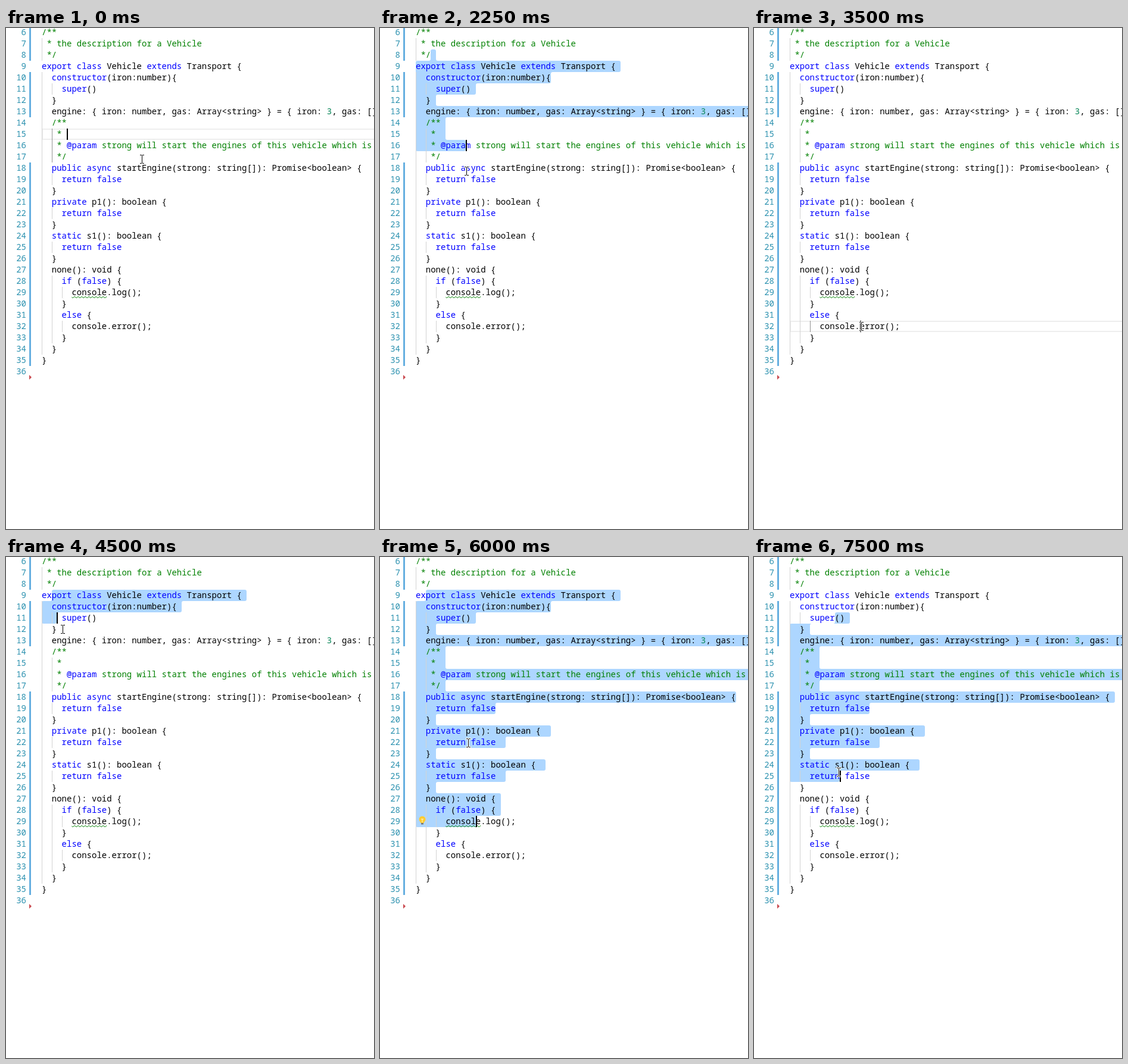
An HTML page with a canvas for the animation above (8000 ms loop, 618 by 842 pixels).

```html
<!DOCTYPE html>
<html lang="en">
<head>
<meta charset="utf-8">
<title>Code editor selection</title>
<style>
  html, body { margin: 0; width: 100%; height: 100%; overflow: hidden; background: #fff; }
  canvas { display: block; }
</style>
</head>
<body>
<canvas id="stage" width="618" height="842"></canvas>
<script>
const ctx = document.getElementById('stage').getContext('2d');
const W = 618, H = 842, LOOP = 8000;
const LEFT = 60, CHAR = 8.4, ROW = 19, FIRST = 6;

// Trailing spaces matter: they widen the selection.
const code = [
  '/**',
  ' * the description for a Vehicle',
  ' */',
  'export class Vehicle extends Transport {',
  '  constructor(iron:number){',
  '    super()',
  '  }',
  '  engine: { iron: number, gas: Array<string> } = { iron: 3, gas: [] }',
  '  /**',
  '   * ',
  '   * @param strong will start the engines of this vehicle which is fast',
  '   */',
  '  public async startEngine(strong: string[]): Promise<boolean> {',
  '    return false',
  '  }',
  '  private p1(): boolean { ',
  '    return false ',
  '  }',
  '  static s1(): boolean { ',
  '    return false ',
  '  }',
  '  none(): void {',
  '    if (false) {',
  '      console.log();',
  '    }',
  '    else {',
  '      console.error();',
  '    }',
  '  }',
  '}',
  ''
];

const keywords = /^(export|class|extends|constructor|super|public|async|private|static|return|false|if|else)$/;

// Each guide: column, first line, last line.
const guides = [
  [0, 7, 8], [0, 10, 34], [2, 11, 11], [2, 15, 17], [2, 19, 19],
  [2, 22, 22], [2, 25, 25], [2, 28, 33], [4, 29, 29], [4, 32, 32]
];

// at: time, mouse: pointer centre, caret: [line, column], from: selection anchor,
// bare: selected lines drawn without a line-break cell.
const steps = [
  { at: 0, mouse: [228, 220], caret: [15, 5] },
  { at: 250, mouse: [227, 223], caret: [17, 5] },
  { at: 500, mouse: [220, 210], caret: [17, 5] },
  { at: 750, mouse: [190, 160], caret: [17, 5] },
  { at: 1000, mouse: [150, 105], caret: [17, 5] },
  { at: 1250, mouse: [122, 65], caret: [17, 5] },
  { at: 1500, mouse: [113, 48], caret: [8, 3] },
  { at: 1750, mouse: [117, 77], caret: [8, 3] },
  { at: 2000, mouse: [130, 145], from: [8, 3], caret: [11, 8] },
  { at: 2250, mouse: [145, 240], from: [8, 3], caret: [16, 10] },
  { at: 2500, mouse: [158, 355], from: [8, 3], caret: [19, 13] },
  { at: 2750, mouse: [166, 410], from: [8, 3], caret: [22, 15] },
  { at: 3000, mouse: [172, 452], from: [8, 3], caret: [24, 19], hideCaret: true },
  { at: 3250, mouse: [178, 490], from: [8, 3], caret: [28, 14] },
  { at: 3500, mouse: [180, 501], caret: [32, 14] },
  { at: 3750, mouse: [176, 495], caret: [32, 14] },
  { at: 4000, mouse: [120, 240], caret: [32, 14] },
  { at: 4250, mouse: [80, 66], caret: [9, 2] },
  { at: 4500, mouse: [95, 121], from: [9, 2], caret: [11, 3], bare: [] },
  { at: 4750, mouse: [135, 315], from: [9, 2], caret: [21, 8], bare: [10, 18, 19] },
  { at: 5000, mouse: [158, 444], from: [9, 2], caret: [29, 12], bare: [10, 18, 19] },
  { at: 5500, mouse: [157, 430], from: [9, 2], caret: [29, 12], bare: [10, 18, 19], bulb: true },
  { at: 5750, mouse: [152, 360], from: [9, 2], caret: [29, 12], bare: [10, 18, 19], bulb: true },
  { at: 6000, mouse: [148, 312], from: [9, 2], caret: [29, 12], bare: [10, 18, 19], bulb: true },
  { at: 6500, mouse: [138, 108], caret: [11, 9], brackets: true },
  { at: 7000, mouse: [140, 189], from: [11, 9], caret: [14, 5], brackets: true },
  { at: 7250, mouse: [141, 280], from: [11, 9], caret: [19, 10] },
  { at: 7500, mouse: [142, 361], from: [11, 9], caret: [25, 10] }
];

const colX = col => LEFT + col * CHAR;
const lineY = line => (line - FIRST) * ROW - 2;

function box(color, x, y, w, h) {
  ctx.fillStyle = color;
  ctx.fillRect(x, y, w, h);
}

// Fills the small concave notch where two selection rows of different width meet.
function notch(x, y, dx, dy) {
  ctx.beginPath();
  ctx.moveTo(x, y);
  ctx.lineTo(x + dx, y);
  ctx.quadraticCurveTo(x, y, x, y + dy);
  ctx.fill();
}

function drawSelection({ from, caret, bare = [10, 19] }) {
  const rows = [];
  for (let line = from[0]; line <= caret[0]; line++) {
    const cells = code[line - FIRST].length + (bare.includes(line) ? 0 : 1);
    rows.push({
      y: lineY(line),
      left: Math.round(line === from[0] ? colX(from[1]) : LEFT),
      right: Math.round(line === caret[0] ? colX(caret[1]) : colX(cells))
    });
  }
  ctx.fillStyle = '#add6ff';
  rows.forEach((row, i) => {
    const prev = rows[i - 1], next = rows[i + 1];
    const corners = [
      !prev || prev.left > row.left,
      !prev || prev.right < row.right,
      !next || next.right < row.right,
      !next
    ].map(round => round ? 3 : 0);
    ctx.beginPath();
    ctx.roundRect(row.left, row.y, row.right - row.left, ROW, corners);
    ctx.fill();
    if (!next) return;
    if (next.right < row.right) notch(next.right, next.y, 3, 3);
    if (next.right > row.right) notch(row.right, next.y, 3, -3);
    if (next.left < row.left) notch(row.left, next.y, -3, -3);
  });
}

function drawLineHighlight(line) {
  const y = lineY(line);
  ctx.strokeStyle = '#eee';
  ctx.lineWidth = 2;
  ctx.strokeRect(LEFT + 1, y + 1, W, ROW - 2);
}

function drawGuides(step) {
  const line = step.caret[0];
  const indent = code[line - FIRST].search(/\S|$/);
  const inside = ([, first, last]) => line >= first && line <= last;
  const active = step.from ? null :
    guides.filter(g => inside(g) && g[0] < indent).pop();
  for (const guide of guides) {
    const [col, first, last] = guide;
    box(guide === active ? '#939393' : '#d3d3d3',
      Math.round(colX(col)), lineY(first), 1, (last - first + 1) * ROW);
  }
}

function tokenColor(token, comment) {
  if (token === '@param' || (!comment && keywords.test(token))) return '#0000ff';
  if (comment) return '#008000';
  return /^\d+$/.test(token) ? '#098658' : '#000';
}

function drawCode() {
  ctx.font = '14px "Noto Sans Mono", "DejaVu Sans Mono", monospace';
  ctx.textBaseline = 'alphabetic';
  code.forEach((text, i) => {
    const y = lineY(i + FIRST) + 14;
    const comment = /^\s*\/?\*/.test(text);
    ctx.textAlign = 'left';
    for (const match of text.matchAll(/@?\w+|[^\w\s@]+/g)) {
      ctx.fillStyle = tokenColor(match[0], comment);
      ctx.fillText(match[0], colX(match.index), y);
    }
    ctx.textAlign = 'right';
    ctx.fillStyle = '#2b91af';
    ctx.fillText(i + FIRST, 34, y);
  });
}

function drawSquiggle() {
  const start = colX(6), end = colX(13), y = lineY(29) + 16;
  ctx.save();
  ctx.beginPath();
  ctx.rect(start, y, end - start, 3);
  ctx.clip();
  ctx.beginPath();
  for (let x = start - 1.2; x < end + 6; x += 6) {
    ctx.lineTo(x, y + 0.3);
    ctx.lineTo(x + 3, y + 2.7);
  }
  ctx.strokeStyle = '#008000';
  ctx.lineWidth = 1;
  ctx.stroke();
  ctx.restore();
}

function drawGutter() {
  for (const [first, last] of [[6, 8], [10, 13], [18, 35]])
    box('#66afe0', 39, lineY(first), 3, (last - first + 1) * ROW);
  const y = lineY(37);
  ctx.fillStyle = '#ca4b51';
  ctx.beginPath();
  ctx.moveTo(39, y - 4);
  ctx.lineTo(43, y);
  ctx.lineTo(39, y + 4);
  ctx.fill();
}

function drawBrackets() {
  for (const col of [9, 10]) {
    const x = Math.round(colX(col));
    box('rgba(0,100,0,0.1)', x, lineY(11), 8, ROW);
    ctx.strokeStyle = '#b9b9b9';
    ctx.lineWidth = 1;
    ctx.strokeRect(x + 0.5, lineY(11) + 0.5, 8, ROW - 1);
  }
}

function drawBulb() {
  const x = 71, y = lineY(29) + 6;
  ctx.fillStyle = '#fc3';
  ctx.beginPath();
  ctx.arc(x, y, 5.5, 0, Math.PI * 2);
  ctx.fill();
  box('#fc3', x - 3, y + 3, 6, 3);
  box('#fff3c4', x - 2, y - 1, 4, 1);
  box('#fff3c4', x - 0.5, y, 1, 5);
  box('#777', x - 2, y + 6, 4, 2.5);
}

function drawPointer([x, y]) {
  const parts = [[-3, -7, 3, 1], [1, -7, 3, 1], [0, -6, 1, 13], [-3, 7, 3, 1], [1, 7, 3, 1]];
  for (const [dx, dy, w, h] of parts) box('#fff', x + dx - 1, y + dy - 1, w + 2, h + 2);
  for (const [dx, dy, w, h] of parts) box('#000', x + dx, y + dy, w, h);
}

function draw(time) {
  const step = steps.findLast(s => s.at <= time);
  const [line, col] = step.caret;
  box('#fff', 0, 0, W, H);
  if (step.from) drawSelection(step);
  else drawLineHighlight(line);
  if (step.brackets) drawBrackets();
  drawGuides(step);
  drawCode();
  drawSquiggle();
  drawGutter();
  if (step.bulb) drawBulb();
  if (!step.hideCaret) box('#000', Math.round(colX(col)), lineY(line), 2, ROW);
  drawPointer(step.mouse);
}

const begin = performance.now();
function tick() {
  draw((performance.now() - begin) % LOOP);
  requestAnimationFrame(tick);
}
tick();
</script>
</body>
</html>
```
